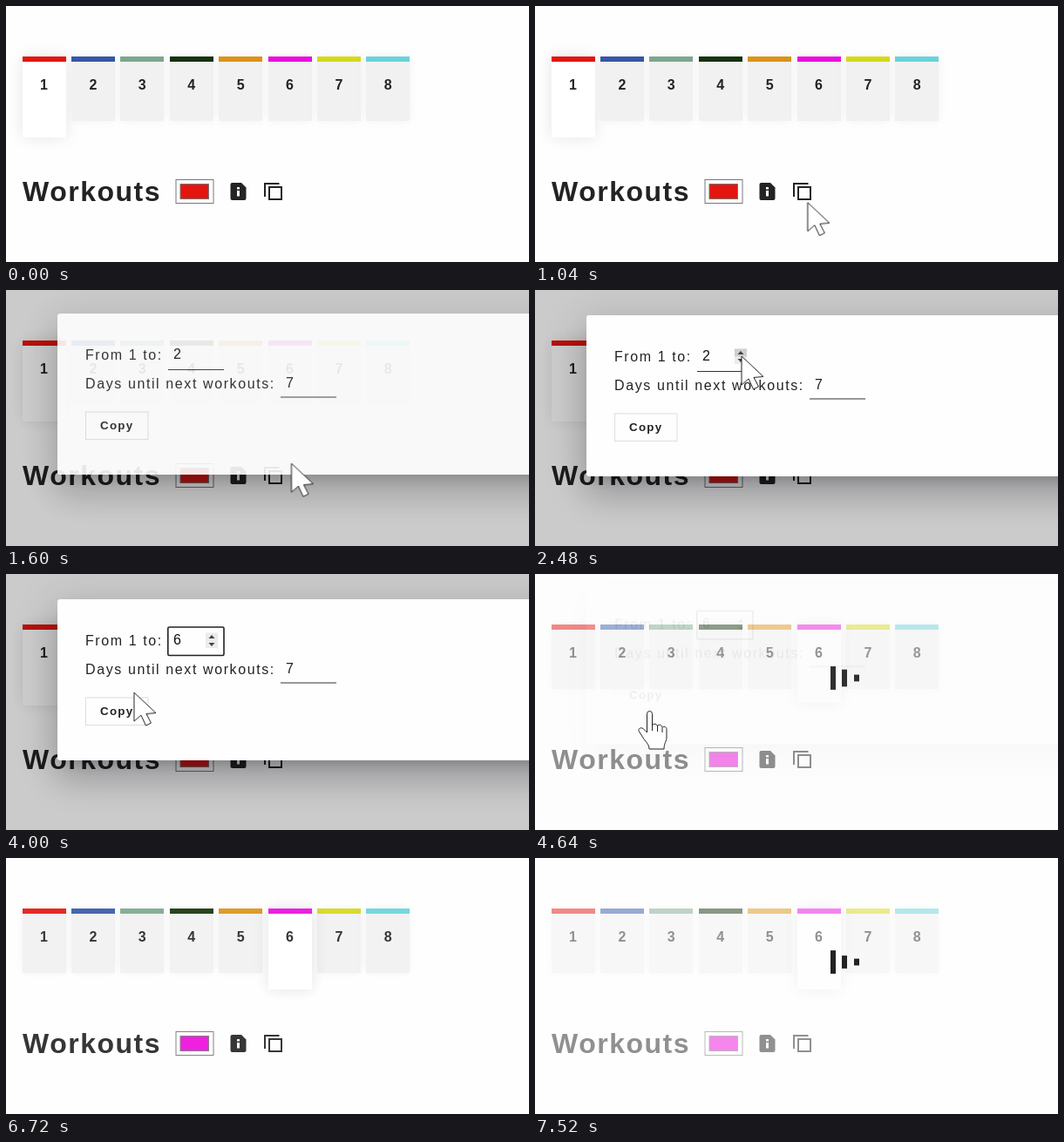
Write an HTML page that moves like this. It is 600 px wide and 294 px high and loops after 7.6 s.

```html
<!DOCTYPE html>
<html lang="en">
<head>
<meta charset="utf-8">
<title>Workouts</title>
<style>
  :root { --loop: 7600ms; --wave: calc(var(--loop) / 13); --ink: #232323; }
  html, body { margin: 0; width: 100%; height: 100%; overflow: hidden; background: #fefefe; }
  #stage { position: relative; width: 600px; height: 294px; overflow: hidden; font-family: "Liberation Sans", Arial, sans-serif; }
  #stage div, svg { position: absolute; }
  svg { left: 0; top: 0; overflow: visible; }
  text { fill: var(--ink); font-size: 16px; letter-spacing: 1.6px; }
  .bold { font-weight: bold; }
  .anim { animation: var(--loop) linear infinite; }

  /* Page */
  #page { inset: 0; animation-name: dim; }
  .tab { top: 58px; width: 50px; height: 74px; box-sizing: border-box; border-top: 6px solid; background: #f1f1f1; box-shadow: 0 0 12px rgba(0,0,0,.05); }
  .tab span { position: absolute; left: 0; right: 0; top: 18px; text-align: center; font: bold 16px/18px "Liberation Sans", Arial, sans-serif; color: var(--ink); }
  .first { animation-name: deselect; }
  .sixth { animation-name: select; }
  #swatch { animation-name: swap; }
  @keyframes dim {
    0%, 58.4% { opacity: 1; }
    60%, 75.8% { opacity: .5; }
    78.9%, 88% { opacity: 1; }
    90.5%, 100% { opacity: .5; }
  }
  @keyframes deselect {
    0%, 58.4% { height: 93px; background: #fff; box-shadow: 0 0 18px rgba(0,0,0,.1); }
    60.4%, 100% { height: 74px; background: #f1f1f1; box-shadow: 0 0 12px rgba(0,0,0,.05); }
  }
  @keyframes select {
    0%, 58.8% { height: 74px; background: #f1f1f1; box-shadow: 0 0 12px rgba(0,0,0,.05); z-index: 0; }
    61.5%, 100% { height: 93px; background: #fff; box-shadow: 0 0 18px rgba(0,0,0,.12); z-index: 1; }
  }
  @keyframes swap {
    0%, 58.9% { fill: #e4150f; }
    59.2%, 100% { fill: #ee0cdc; }
  }

  /* Loader */
  #loader { left: 339px; top: 106px; width: 32px; height: 27px; animation-name: loading; animation-timing-function: step-end; }
  #loader div { width: 5.5px; height: 27px; background: #222; animation: pulse calc(var(--wave) / 2) ease-in-out infinite alternate; }
  #loader div:nth-child(1) { animation-delay: calc(-57ms - var(--wave)); }
  #loader div:nth-child(2) { left: 13px; animation-delay: calc(-57ms - var(--wave) * .75); }
  #loader div:nth-child(3) { left: 26.5px; animation-delay: calc(-57ms - var(--wave) * .5); }
  @keyframes loading {
    0% { visibility: hidden; }
    59.6% { visibility: visible; }
    76.9% { visibility: hidden; }
    88.8%, 100% { visibility: visible; }
  }
  @keyframes pulse { from { transform: scaleY(1); } to { transform: scaleY(.28); } }

  /* Dialog */
  #veil { inset: 0; background: rgba(0,0,0,.2); animation-name: veil; }
  #dialog {
    left: 59px; top: 29px; width: 600px; height: 185px; border-radius: 3px; background: #fefefe;
    box-shadow: 0 11px 15px -7px rgba(0,5,20,.2), 0 24px 38px 3px rgba(0,5,20,.14), 0 9px 46px 8px rgba(0,5,20,.12);
    animation-name: dialog;
  }
  #count { left: 133px; top: 38px; width: 14px; height: 18px; overflow: hidden; }
  #count div { font-size: 16px; line-height: 18px; color: #111; white-space: pre; animation-name: count; animation-timing-function: step-end; }
  #focus { animation-name: focus; animation-timing-function: step-end; }
  #spin { animation-name: spin; animation-timing-function: step-end; }
  #hover { animation-name: hover; animation-timing-function: step-end; }
  @keyframes veil {
    0%, 17.3% { opacity: 0; }
    18%, 57.9% { opacity: 1; }
    61.1%, 100% { opacity: 0; }
  }
  @keyframes dialog {
    0% { opacity: 0; transform: translateY(-20px); }
    17.2% { opacity: 0; transform: translateY(-20px); animation-timing-function: ease-out; }
    22.4%, 57.9% { opacity: 1; transform: none; }
    61.3%, 100% { opacity: 0; transform: translateY(-20px); }
  }
  @keyframes count {
    0% { transform: none; }
    36.8% { transform: translateY(-18px); }
    40% { transform: translateY(-36px); }
    41.5% { transform: translateY(-54px); }
    43.1%, 100% { transform: translateY(-72px); }
  }
  @keyframes focus { 0% { opacity: 0; } 36.8%, 100% { opacity: 1; } }
  @keyframes spin { 0% { opacity: 0; } 30.5%, 100% { opacity: 1; } }
  @keyframes hover { 0% { opacity: 0; } 31.5% { opacity: 1; } 50%, 100% { opacity: 0; } }

  /* Pointer */
  #pointer { left: 0; top: 0; animation-name: move; animation-timing-function: ease-in-out; }
  #pointer path { fill: #fff; stroke: #222; stroke-linejoin: round; }
  #arrow { animation-name: arrow; animation-timing-function: step-end; }
  #hand { animation-name: hand; animation-timing-function: step-end; }
  @keyframes move {
    0%, 6.8% { transform: translate(338px, 304px); }
    16%, 18.9% { transform: translate(309px, 214px); }
    23.1%, 24.6% { transform: translate(344px, 186px); }
    32.4% { transform: translate(237px, 76px); }
    34.7%, 48.9% { transform: translate(236px, 73px); animation-timing-function: linear; }
    52.63% { transform: translate(147px, 136px); animation-timing-function: ease-out; }
    57%, 61.6% { transform: translate(131px, 157px); animation-timing-function: ease-in; }
    65.5%, 100% { transform: translate(118px, 330px); }
  }
  @keyframes arrow {
    0% { opacity: 1; }
    15.2% { opacity: 0; }
    19.2% { opacity: 1; }
    53.6% { opacity: 0; }
    62.4%, 100% { opacity: 1; }
  }
  @keyframes hand {
    0% { opacity: 0; }
    15.2% { opacity: 1; }
    19.2% { opacity: 0; }
    53.6% { opacity: 1; }
    62.4%, 100% { opacity: 0; }
  }
</style>
</head>
<body>
<div id="stage">
  <div id="page" class="anim">
    <div id="tabs"></div>
    <svg width="600" height="294">
      <text class="bold" x="19" y="224" style="font-size:32px;letter-spacing:1.5px">Workouts</text>
      <rect x="195" y="199.5" width="43" height="27" fill="#fff" stroke="#777"/>
      <rect id="swatch" class="anim" x="200" y="204.5" width="32.5" height="17" stroke="#777"/>
      <path fill="#232323" d="M259.500 203H270l5.500 5.500V221a2 2 0 0 1-2 2h-14a2 2 0 0 1-2-2V205a2 2 0 0 1 2-2Z"/>
      <path fill="#fff" d="M265 208h3v2.500h-3zM265 212h3v6.500h-3z"/>
      <path fill="none" stroke="#232323" stroke-width="2" d="M297 219V204H313.500M302 208H316V222H302Z"/>
    </svg>
  </div>

  <div id="loader" class="anim"><div></div><div></div><div></div></div>
  <div id="veil" class="anim"></div>

  <div id="dialog" class="anim">
    <svg width="541" height="185" viewBox="59 29 541 185">
      <text x="91" y="82">From 1 to:</text>
      <text x="91" y="114.500">Days until next workouts:</text>
      <text x="321" y="114">7</text>
      <path stroke="#333" d="M186 93.500H250M315 125H379"/>
      <rect id="focus" class="anim" x="185.800" y="61" width="64.200" height="32.500" rx="1.500" fill="none" stroke="#222" stroke-width="1.600"/>
      <g id="spin" class="anim">
        <path fill="#ececec" d="M229 67.500h14v17.500h-14z"/>
        <path id="hover" class="anim" fill="#cfcfcf" d="M229 67.500h14v9h-14z"/>
        <path fill="#444" d="M232.500 74l3.500-4 3.500 4zM232.500 79l3.500 4 3.500-4z"/>
      </g>
      <rect x="91.500" y="142" width="71.500" height="31.500" fill="#fefefe" stroke="#ddd"/>
      <text class="bold" x="108" y="162" style="font-size:13.33px;letter-spacing:1.3px">Copy</text>
    </svg>
    <div id="count"><div class="anim">2
3
4
5
6</div></div>
  </div>

  <svg id="pointer" class="anim" width="1" height="1">
    <path id="arrow" class="anim" d="M0 0V33L8 26 13.500 38 19.500 35 14 24.500 25 23.500Z"/>
    <g id="hand" class="anim">
      <path d="M-2.500 3.500a3 3 0 0 1 6 0V17c1-3 6-2 6 1 1-3 5.500-2 5.500 1.500 1-2 5-1.500 5 2V31c0 4-3 6-3 13H0C0 38-5 35-7 31L-11.500 24c-2-3 2-6 5-3L-2.500 25Z"/>
      <path d="M3.500 17v6M9.500 18v6M15 20v5"/>
    </g>
  </svg>
</div>
<script>
  const colors = ["#e4150f", "#3457a8", "#7aa88e", "#13320a", "#dc9216", "#ea0be0", "#d6d81b", "#68d3da"];
  const animated = { 0: "anim first", 5: "anim sixth" };
  document.getElementById("tabs").innerHTML = colors.map((color, i) =>
    `<div class="tab ${animated[i] || ""}" style="left:${18.5 + 56.4 * i}px;border-color:${color}"><span>${i + 1}</span></div>`
  ).join("");
</script>
</body>
</html>
```
